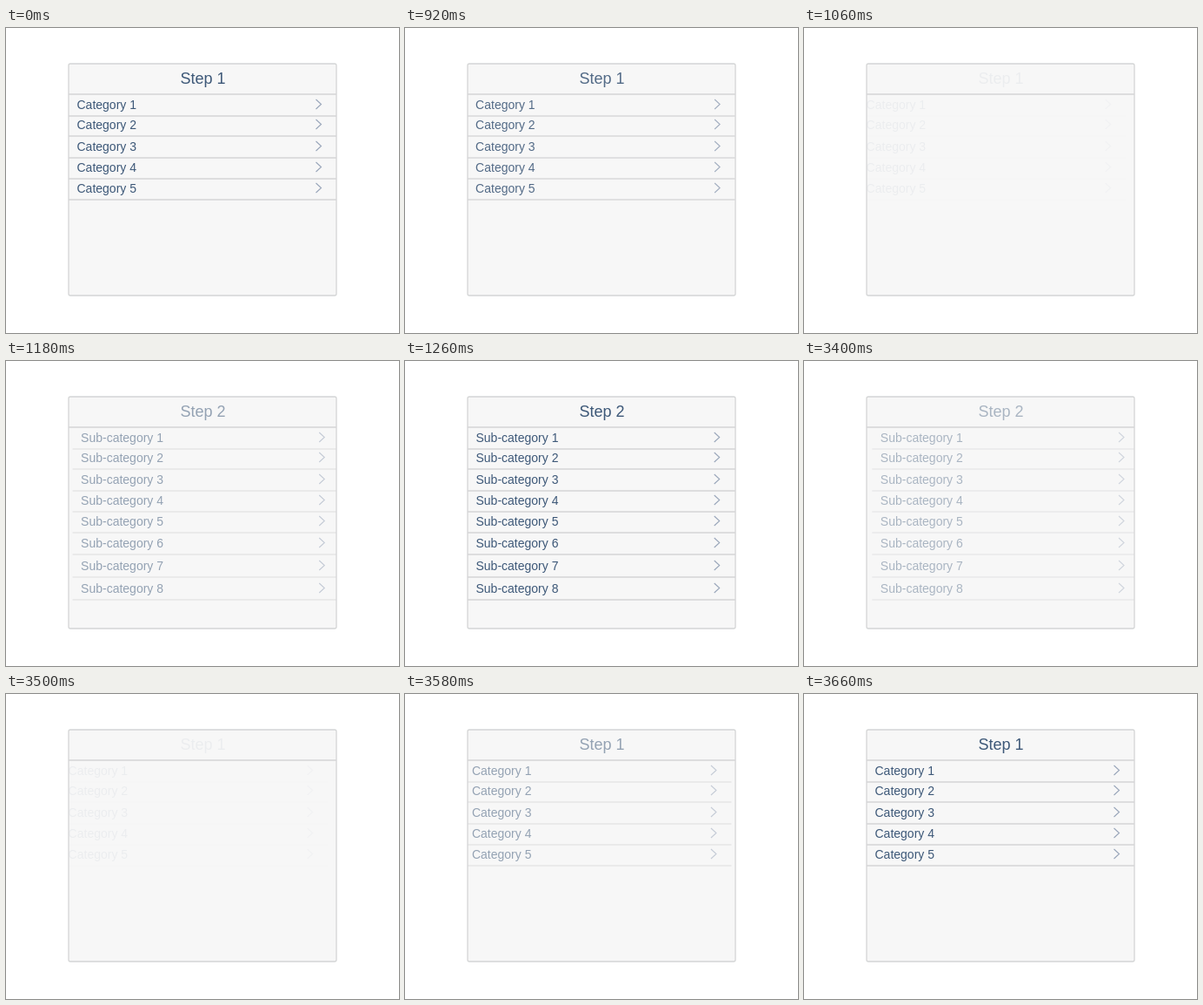
Animation of 452x350 px, one loop 4580 ms. Source, as an HTML page:

```html
<!DOCTYPE html>
<html lang="en">
<head>
<meta charset="utf-8">
<title>Step navigation</title>
<style>
  html, body { margin: 0; width: 100%; height: 100%; overflow: hidden; background: #fff; }
  svg { display: block; width: 452px; height: 350px; }
  text { font-family: "Liberation Sans", Arial, sans-serif; fill: #3d5878; }
  .title { font-size: 18px; }
  .label { font-size: 14px; }
  .line { stroke: #d4d5d6; stroke-width: 1.3; fill: none; }
  .chevron { stroke: #98a5b9; stroke-width: 1.1; fill: none; }
</style>
</head>
<body>
<svg viewBox="0 0 452 350">
  <defs>
    <clipPath id="inside"><rect x="72" y="41" width="308" height="266"/></clipPath>
  </defs>
  <rect x="72" y="41" width="308" height="266" rx="2" fill="#f7f7f7"/>
  <g clip-path="url(#inside)" id="pages"></g>
  <path class="line" d="M72 76H380"/>
  <rect class="line" x="72" y="41" width="308" height="266" rx="2"/>
</svg>
<script>
const LOOP = 4580, TICK = 20, FADE = 170, SHIFT = 10;
const FORWARD = 900, BACK = 3300, GAP = 190;
const ROW_Y = [88, 111, 136, 160, 184, 209, 235, 261];
const LINE_Y = [101, 124, 149, 173, 197, 222, 248, 274];

function add(parent, tag, attrs, text) {
  const el = document.createElementNS("http://www.w3.org/2000/svg", tag);
  for (const key in attrs) el.setAttribute(key, attrs[key]);
  if (text) el.textContent = text;
  return parent.appendChild(el);
}

function makePage(title, label, count, chevronX) {
  const page = add(document.getElementById("pages"), "g", {});
  add(page, "text", { class: "title", x: 200.6, y: 64 }, title);
  const list = add(page, "g", {});
  for (let i = 0; i < count; i++) {
    const y = ROW_Y[i];
    add(list, "text", { class: "label", x: 81.5, y: y + 5 }, `${label} ${i + 1}`);
    add(list, "path", { class: "chevron", d: `M${chevronX} ${y - 6}l6 5.5l-6 5.5` });
    add(list, "path", { class: "line", d: `M72 ${LINE_Y[i]}H380` });
  }
  return { page, list };
}

const first = makePage("Step 1", "Category", 5, 356.5);
const second = makePage("Step 2", "Sub-category", 8, 355.7);

const progress = (t, start) => Math.min(1, Math.max(0, (t - start) / FADE));
const smooth = p => p * p * (3 - 2 * p);

// Shown: 1 is fully in place, 0 is faded out and moved aside.
function place({ page, list }, shown, side) {
  page.setAttribute("opacity", shown);
  page.setAttribute("visibility", shown > 0 ? "visible" : "hidden");
  list.setAttribute("transform", `translate(${side * SHIFT * smooth(1 - shown)} 0)`);
}

function draw(time) {
  const t = Math.floor((time % LOOP) / TICK) * TICK;
  place(first, 1 - progress(t, FORWARD) + progress(t, BACK + GAP), -1);
  place(second, progress(t, FORWARD + GAP) - progress(t, BACK), 1);
}

const start = performance.now();
function frame() {
  draw(performance.now() - start);
  requestAnimationFrame(frame);
}
frame();
</script>
</body>
</html>
```
